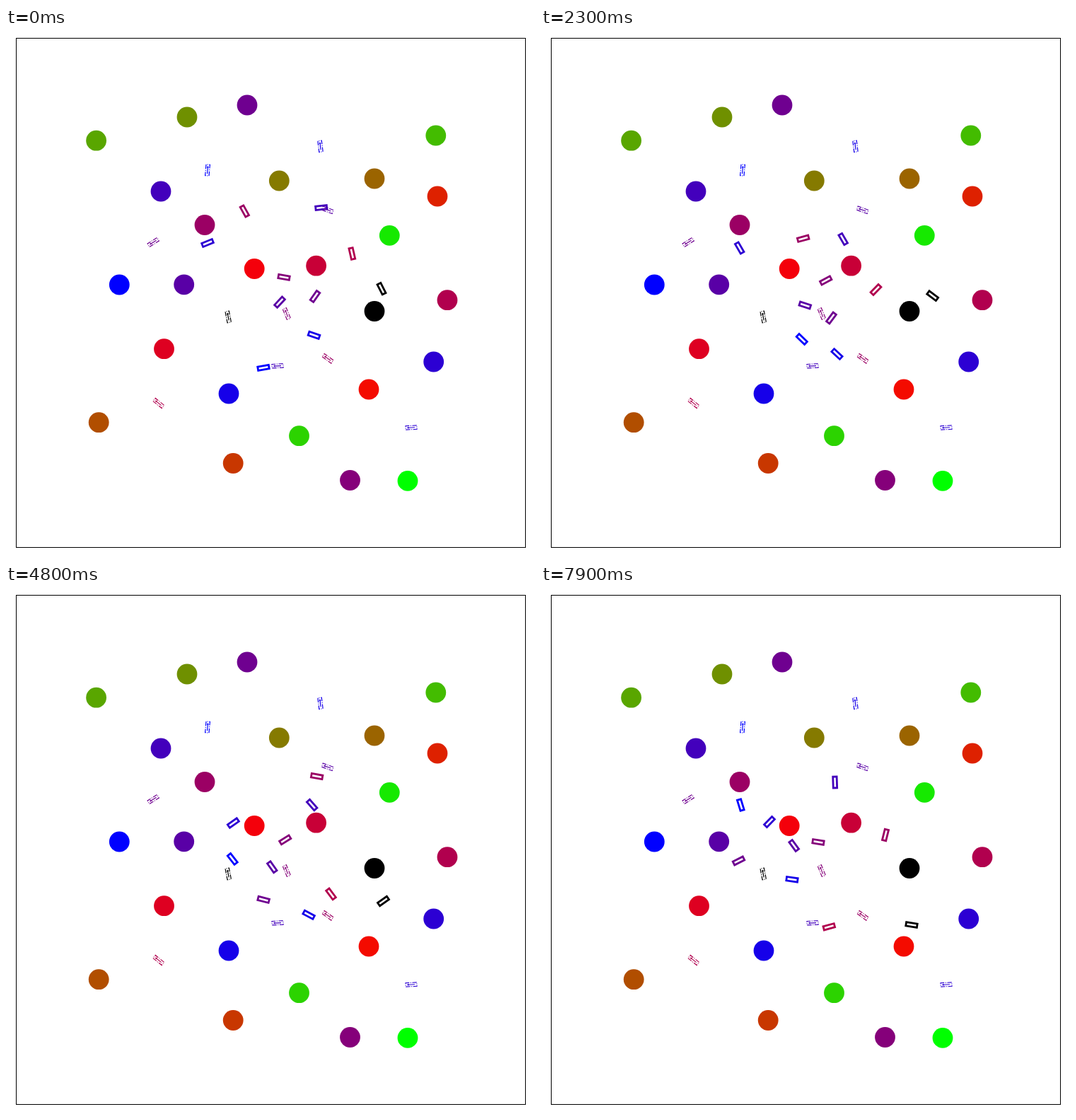
Recreate the animation shown at these times as an HTML page with a canvas. Size 748 by 748 pixels, loop 8 s.

```html
<!DOCTYPE html>
<html lang="en">
<head>
<meta charset="utf-8">
<title>Vehicles and goals</title>
<style>
  html, body { margin: 0; width: 100%; height: 100%; overflow: hidden; background: #fff; }
  canvas { display: block; }
</style>
</head>
<body>
<canvas id="stage" width="748" height="748"></canvas>
<script>
const ctx = document.getElementById('stage').getContext('2d');
const LOOP = 8000, STEP = 100;
const RADIUS = 14.4, CAR_LENGTH = 15.8, CAR_WIDTH = 5.4;
const KEY_STEPS = [0, 22, 40, 55, 78];
const LAUNCH_SPEED = 1;
const rad = deg => deg * Math.PI / 180;

// Obstacles run along the blue, red, green ramp; the last one is black.
const obstacles = [
  [160.3, 363], [315, 517], [604.7, 472], [219, 231], [251.7, 362.8],
  [341, 109], [486.5, 639.5], [281, 278.5], [624, 384.7], [438.6, 336.2],
  [223.5, 453.7], [351.2, 340.5], [513, 511], [610, 238], [321.2, 615.5],
  [131.2, 557.7], [521, 213], [386.3, 216], [256, 126], [127.6, 159.2],
  [607.8, 152], [414.5, 576.7], [542.3, 293.4], [568, 640.4], [521, 400.5]
];

// Every pose is x, y, heading in degrees: first the goal, then the few turning points.
const cars = [
  car([285, 201, -85], [364, 480.3, -10], [368.8, 440, -136], [333, 406, -123], [303.5, 370.7, -150], [282.3, 311, -107]),
  car([444.5, 167.3, -97], [435.5, 434.3, 199], [418.5, 461, 43], [436.7, 469.7, 43], [412.5, 455.5, 51], [355, 416.3, 8]),
  car([573, 565, 177], [285, 304, 158], [280.7, 311, 240], [317, 339.7, 152], [324, 334, 144], [323, 335, 134]),
  car([384, 477.8, 177], [445.7, 254, 174], [427.2, 298.5, 60], [431, 309, 46], [431.5, 309.7, 51], [415.7, 279, 88]),
  car([454.7, 257.3, 200], [387, 387.7, 133], [373.3, 392, 198], [371.5, 392, 234], [379.5, 403.3, 236], [357.7, 368.5, 234]),
  car([208.2, 303, 148], [437, 379.5, 125], [410.5, 410, 127], [385, 448.5, 187], [338.8, 433.4, 222], [279.5, 390, 153]),
  car([396.8, 404, 248], [393, 352.4, 10], [402.7, 357, -28], [384, 366.5, -53], [407.7, 353, -57], [392, 363.4, 9]),
  car([455, 467.3, 216], [337.3, 259, 61], [370.7, 297.7, -15], [416.5, 271.3, -18], [463.5, 281.5, 47], [487, 353.5, 104]),
  car([215.7, 530.5, 219], [489.3, 319, 77], [473.5, 370, 134], [450, 419, 90], [470.8, 454.3, 93], [407.3, 483.3, 165]),
  car([314.2, 408.5, 259], [531, 368.7, 63], [553.7, 378.7, 37], [552.8, 433.3, 136], [517.5, 461, 95], [524, 480.5, 189])
];

function car(goal, ...poses) {
  const path = poses.map(([x, y, deg], i) => ({ step: KEY_STEPS[i], x, y, angle: rad(deg) }));
  path.forEach((p, i) => {
    const speed = i ? rollingSpeed(path[i - 1], p, path[i + 1] || p) : LAUNCH_SPEED;
    p.vx = speed * Math.cos(p.angle);
    p.vy = speed * Math.sin(p.angle);
  });
  return { goal, path };
}

// A car rolls only along its heading, so keep that part of the average velocity.
function rollingSpeed(before, at, after) {
  const along = (after.x - before.x) * Math.cos(at.angle) + (after.y - before.y) * Math.sin(at.angle);
  return along / (after.step - before.step);
}

// Cubic Hermite curve: position and velocity along one axis.
function hermite(from, to, vFrom, vTo, u, span) {
  const w = 1 - u, a = vFrom * span, b = vTo * span;
  return [
    from + (to - from) * u * u * (3 - 2 * u) + a * u * w * w - b * u * u * w,
    ((to - from) * 6 * u * w + a * w * (1 - 3 * u) + b * u * (3 * u - 2)) / span
  ];
}

function poseAt(path, step) {
  const last = path.findIndex(p => p.step >= Math.max(step, 1));
  const a = path[last - 1], b = path[last];
  const span = b.step - a.step, u = (step - a.step) / span;
  const [x, dx] = hermite(a.x, b.x, a.vx, b.vx, u, span);
  const [y, dy] = hermite(a.y, b.y, a.vy, b.vy, u, span);

  // Follow the tangent, forwards or in reverse, when the car moves fast enough.
  const mean = a.angle + (b.angle - a.angle) * u;
  const off = Math.atan2(dy, dx) - mean;
  const turn = off - Math.PI * Math.round(off / Math.PI);
  const speed2 = dx * dx + dy * dy;
  return [x, y, mean + turn * speed2 / (speed2 + 1)];
}

function rampColor(i, count) {
  if (i === count - 1) return '#000';
  const x = 2 * i / (obstacles.length - 2);
  const [r, g, b] = [1 - Math.abs(x - 1), x - 1, 1 - x].map(v => Math.round(255 * Math.max(0, v)));
  return `rgb(${r},${g},${b})`;
}

function drawFrame([x, y, angle], color, lineWidth, drawInside) {
  ctx.save();
  ctx.translate(x, y);
  ctx.rotate(angle);
  ctx.strokeStyle = color;
  ctx.lineWidth = lineWidth;
  if (drawInside) {
    drawInside();
    ctx.setLineDash([6.4, 1.6, 1, 1.6]);
  }
  ctx.scale(1, -1);
  ctx.strokeRect(-CAR_LENGTH / 2, -CAR_WIDTH / 2, CAR_LENGTH, CAR_WIDTH);
  ctx.restore();
}

function drawArrow() {
  ctx.beginPath();
  ctx.moveTo(-5, 0);
  ctx.lineTo(5, 0);
  ctx.moveTo(3.6, -1);
  ctx.lineTo(5, 0);
  ctx.lineTo(3.6, 1);
  ctx.stroke();
}

function draw(now) {
  const step = Math.max(0, Math.floor(now % LOOP / STEP) - 1);
  ctx.fillStyle = '#fff';
  ctx.fillRect(0, 0, 748, 748);
  obstacles.forEach(([x, y], i) => {
    ctx.fillStyle = rampColor(i, obstacles.length);
    ctx.beginPath();
    ctx.arc(x, y, RADIUS, 0, 2 * Math.PI);
    ctx.fill();
  });
  cars.forEach(({ goal: [x, y, deg], path }, i) => {
    const color = rampColor(i, cars.length);
    drawFrame([x, y, rad(deg)], color, 1.2, drawArrow);
    drawFrame(poseAt(path, step), color, 2.8);
  });
  ctx.strokeStyle = '#000';
  ctx.lineWidth = 1;
  ctx.strokeRect(14.5, 14.5, 720, 720);
}

const start = performance.now();
function tick() {
  draw(performance.now() - start);
  requestAnimationFrame(tick);
}
tick();
</script>
</body>
</html>
```
